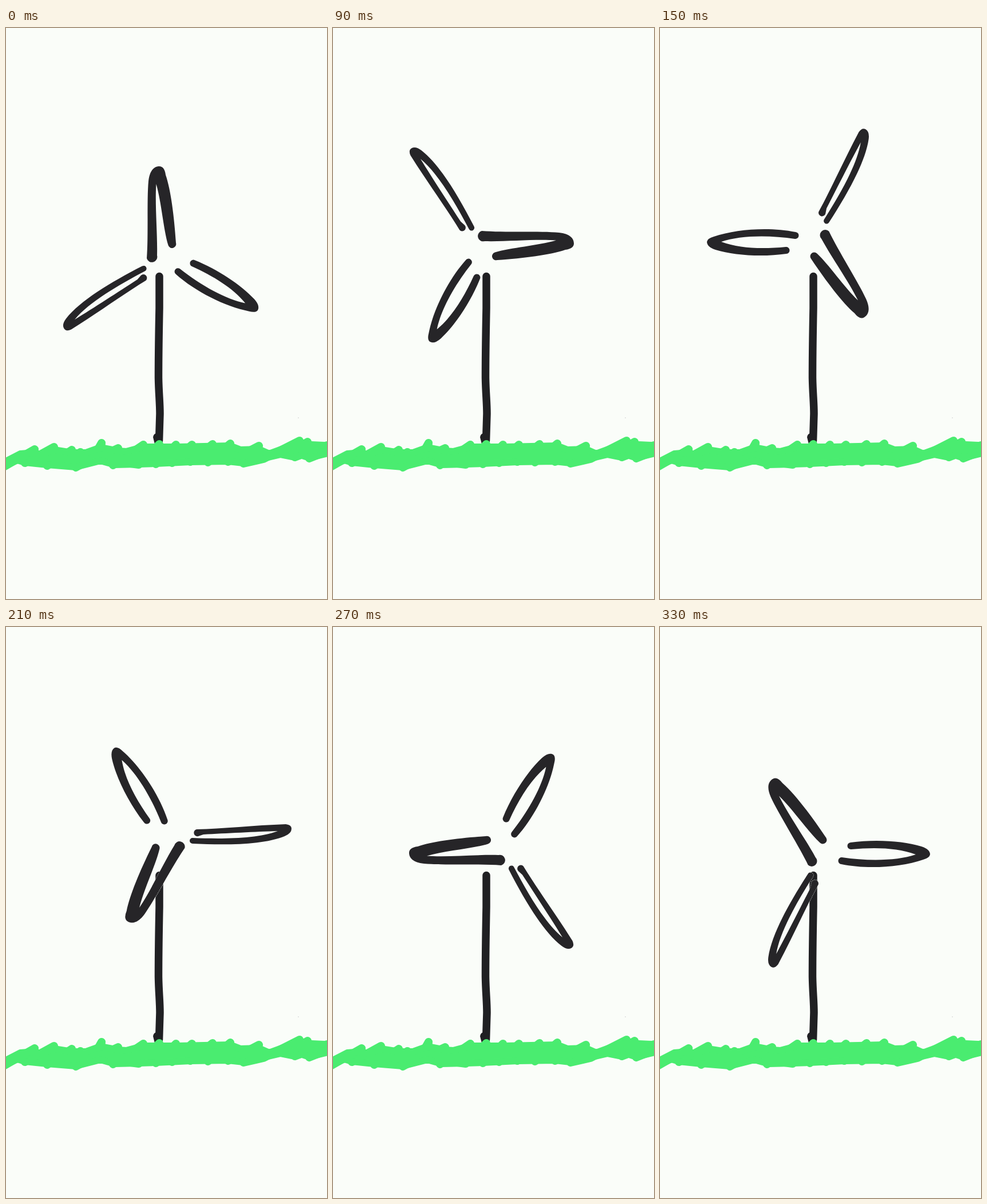
An HTML page for the animation above (360 ms loop, 561 by 999 pixels).

```html
<!DOCTYPE html>
<html lang="en">
<head>
<meta charset="utf-8">
<title>Wind turbine</title>
<style>
  html, body { margin: 0; width: 100%; height: 100%; overflow: hidden; background: #fafdf9; }
  svg { display: block; width: 561px; height: 999px; }
  .line { fill: none; stroke-linecap: round; stroke-linejoin: round; }
  /* Broken pale rim, visible only where a blade crosses the pole */
  #rotor { fill: #262528; stroke: #fafdf9; stroke-opacity: .6; stroke-width: 1.6; stroke-dasharray: 2 1; paint-order: stroke; }
</style>
</head>
<body>
<svg viewBox="0 0 561 999">
  <rect x="510" y="681" width="2" height="2" fill="#e4e6e4"/>

  <g fill="#202023" stroke="#202023">
    <path class="line" stroke-width="13.500" d="M268 434.500L268 490C267 540 266.500 570 266.500 612C267 640 269 655 269 675L267.500 722"/>
    <path stroke="none" d="M257 716Q258 709 264 709H274V728H260Z"/>
  </g>

  <g id="rotor">
    <path d="M246 403C249 365 246 300 249 268C251 249 259 242 268 242
      Q277 242 279 257C288 283 294 330 297 376A6.800 6.800 0 0 1 283.500 380
      C275 352 272 306 262.500 273C260 310 265 360 264 398A9 9 0 0 1 246 403Z"/>
    <path transform="rotate(30 277 386)" d="M333 377C375 371 425 374 457 384Q472 389 472 398
      Q471 404 460 407C420 421 360 424 317 415A6 6 0 0 1 318 403
      C365 410 415 409 447 398C415 386 375 385 334 389A6 6 0 0 1 333 377Z"/>
    <path transform="rotate(-120 277 386)" d="M245 330C244 285 238 230 236 174Q237 164 244 164
      Q252 164 257 176C272 213 273 275 270 337A5 5 0 0 1 260 337
      C262 285 262 225 248 188C249 225 252 280 254 318L257 327A6 6 0 0 1 245 330Z"/>
  </g>

  <g class="line" stroke="#4aec70">
    <path stroke-width="14" d="M-6 769L50 737L33 761L84 733L72 766L115 738L100 765L130 742
      L122 769L165 745L167 726L150 756L196 735L187 765L240 729L210 761L232 764L268 728L262 763
      L297 729L290 761L325 729L322 759L361 728L353 760L392 727L388 759L442 731L415 762L450 754
      L513 722L490 745L527 724L505 751L561 730L530 753L575 735"/>
    <path fill="#4aec70" stroke-width="12" d="M-6 761L25 745L50 743L60 746L84 738L115 743L140 743
      L165 734L196 740L210 741L240 733L300 733L392 731L410 738L442 737L460 745L490 734L513 728L575 731
      V741L530 752L515 747L505 751L480 746L450 753L415 761L388 758L322 759L262 762L232 763L190 764
      L165 757L122 768L72 764L33 760L20 756L-6 768Z"/>
  </g>
</svg>
<script>
  const STEP = 30; // milliseconds and degrees alike
  const LOOP = 360;
  const rotor = document.getElementById("rotor");

  function draw() {
    const angle = Math.floor(performance.now() % LOOP / STEP) * STEP;
    rotor.setAttribute("transform", `rotate(${angle} 277 386)`);
    requestAnimationFrame(draw);
  }
  draw();
</script>
</body>
</html>
```
